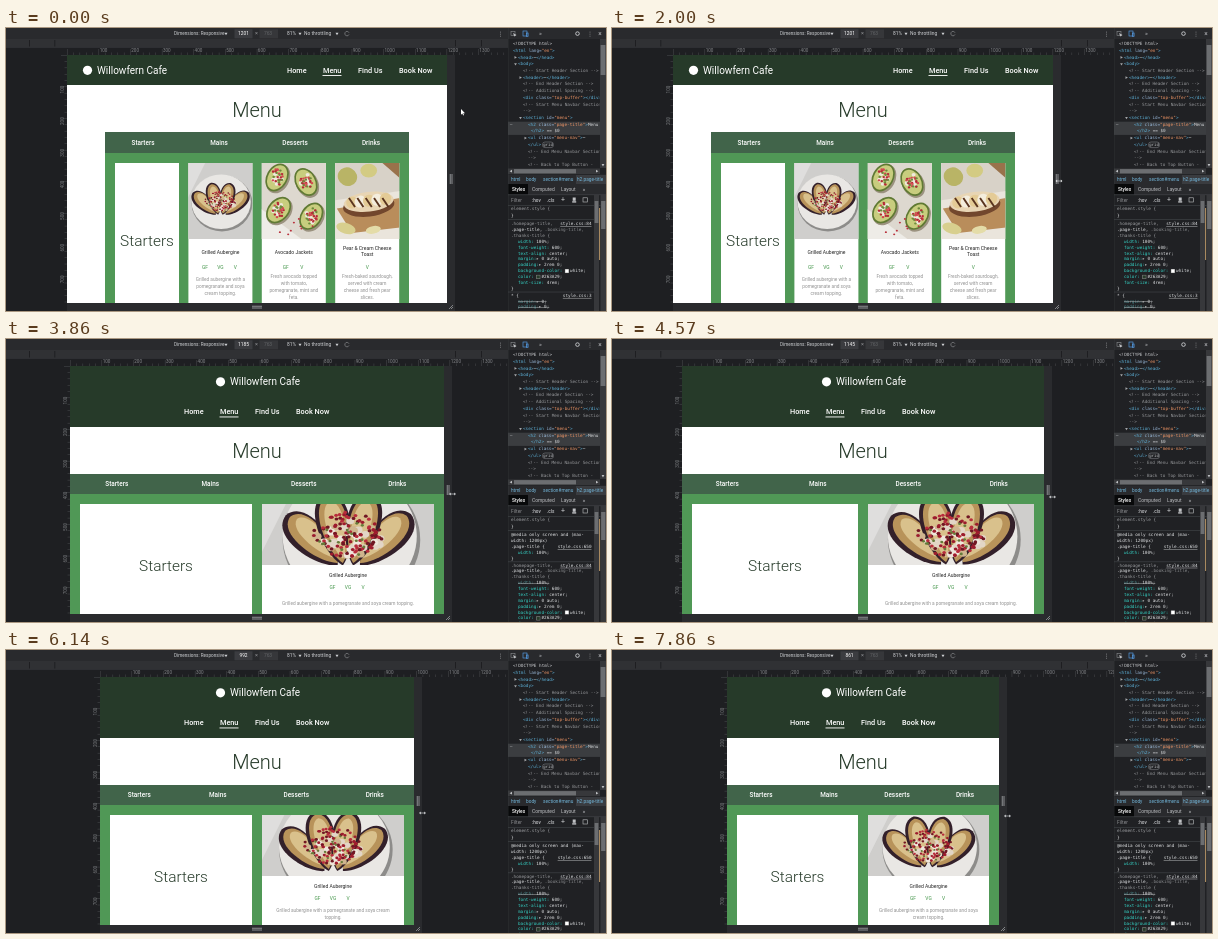
An HTML page with a canvas for the animation above (8000 ms loop, 600 by 283 pixels).

```html
<!DOCTYPE html>
<html lang="en">
<head>
<meta charset="utf-8">
<title>Responsive menu page</title>
<style>
html, body { margin: 0; width: 100%; height: 100%; overflow: hidden; background: #1e1f22; }
canvas { display: block; width: 600px; height: 283px; }
</style>
</head>
<body>
<canvas id="stage"></canvas>
<script>
const W = 600, H = 283, LOOP = 8000, FPS = 7;
const SCALE = 380 / 1201, MID = 251, TOP = 27, BOTTOM = 275;
const SANS = 'Roboto, sans-serif', MONO = '"DejaVu Sans Mono", monospace', CODE = 4.33;
const DARK = '#263a29', BAR = '#41644a', GREEN = '#509856';

// [frame, value] keys, linear in between
const WIDTHS = [[0, 1201], [23, 1201], [24, 1199], [27, 1185], [31, 1157], [37, 1084],
  [43, 992], [47, 948], [51, 907], [55, 861]];
const CURSOR_X = [[0, 456], [1, 456], [9, 447]];
const CURSOR_Y = [[0, 84], [1, 84], [9, 153], [23, 153], [27, 155], [37, 161], [43, 163], [51, 165], [55, 166]];

const canvas = document.getElementById('stage');
const ctx = canvas.getContext('2d');
const dpr = window.devicePixelRatio || 1;
canvas.width = W * dpr;
canvas.height = H * dpr;

function at(keys, f) {
  for (let i = 1; i < keys.length; i++) {
    const [a, va] = keys[i - 1], [b, vb] = keys[i];
    if (f <= b) return va + (vb - va) * (f - a) / (b - a);
  }
  return keys[keys.length - 1][1];
}

function random(seed) {
  return () => (seed = (seed * 16807) % 2147483647) / 2147483647;
}

function rect(x, y, w, h, color) {
  ctx.fillStyle = color;
  ctx.fillRect(x, y, w, h);
}

function text(s, x, y, size, color, align = 'left', font = SANS, weight = 400) {
  ctx.font = `${weight} ${size}px ${font}`;
  ctx.textAlign = align;
  ctx.textBaseline = 'middle';
  ctx.fillStyle = color;
  ctx.fillText(s, x, y);
}

function oval(x, y, rx, ry, color, turn = 0) {
  ctx.fillStyle = color;
  ctx.beginPath();
  ctx.ellipse(x, y, rx, ry, turn, 0, 7);
  ctx.fill();
}

function poly(points, color) {
  ctx.fillStyle = color;
  ctx.beginPath();
  points.forEach(([x, y]) => ctx.lineTo(x, y));
  ctx.fill();
}

function stroke(points, color, width = 0.7) {
  ctx.strokeStyle = color;
  ctx.lineWidth = width;
  ctx.beginPath();
  points.forEach(([x, y], i) => i ? ctx.lineTo(x, y) : ctx.moveTo(x, y));
  ctx.stroke();
}

function arrow(x, y, r, color, open = true) {
  poly(open ? [[x - r, y - r * 0.7], [x + r, y - r * 0.7], [x, y + r]]
    : [[x - r * 0.7, y - r], [x + r, y], [x - r * 0.7, y + r]], color);
}

// Square photo of the given size, cropped to the box, drawn around its centre
function photo(x, y, w, h, paint) {
  const size = Math.max(w, h);
  ctx.save();
  ctx.beginPath();
  ctx.rect(x, y, w, h);
  ctx.clip();
  ctx.translate(x + w / 2, y + h / 2);
  ctx.scale(size, size);
  paint();
  ctx.restore();
}

function seeds(n, seed, cx, cy, rx, ry, r, colors) {
  const next = random(seed);
  for (let i = 0; i < n; i++) {
    const a = next() * 6.28, d = Math.sqrt(next());
    oval(cx + Math.cos(a) * d * rx, cy + Math.sin(a) * d * ry, r, r * 0.85, colors[i % colors.length]);
  }
}

// Half fruit with a narrow base at x, y and a round top
function lobe(x, y, len, wide, turn, color) {
  ctx.save();
  ctx.translate(x, y);
  ctx.rotate(turn);
  ctx.fillStyle = color;
  ctx.beginPath();
  ctx.moveTo(0, 0);
  ctx.bezierCurveTo(-wide, -len * 0.2, -wide * 1.6, -len * 0.95, 0, -len);
  ctx.bezierCurveTo(wide * 1.6, -len * 0.95, wide, -len * 0.2, 0, 0);
  ctx.fill();
  ctx.restore();
}

function aubergine() {
  rect(-0.5, -0.5, 1, 1, '#cfcecc');
  poly([[-0.5, -0.5], [-0.2, -0.5], [-0.5, 0.1]], '#dfdedd');
  oval(0.02, 0.03, 0.4, 0.37, '#8d8c8a');
  oval(0.01, 0.01, 0.39, 0.36, '#e9e7e4');
  for (const [x, len, turn] of [[-0.06, 0.42, -0.8], [0.07, 0.42, 0.78], [-0.03, 0.43, -0.22], [0.03, 0.43, 0.24]]) {
    lobe(x, 0.18, len, 0.1, turn, '#33202a');
    lobe(x, 0.165, len - 0.035, 0.08, turn, '#b8935a');
    lobe(x, 0.14, len - 0.09, 0.055, turn, '#d9c18c');
  }
  seeds(38, 31, 0, 0.02, 0.2, 0.11, 0.023, ['#eee6db', '#e2d5c6', '#cfb58f']);
  seeds(105, 77, 0, 0.0, 0.2, 0.13, 0.011, ['#9c1c2d', '#b82c3c', '#701723']);
  seeds(16, 9, 0, 0.03, 0.19, 0.1, 0.009, ['#657b3a']);
}

function avocado() {
  rect(-0.5, -0.5, 1, 1, '#ddd8cf');
  poly([[-0.5, 0.05], [0.1, 0.5], [-0.5, 0.5]], '#eeece7');
  [[-0.22, -0.31, 0.5], [0.16, -0.25, -0.5], [-0.2, 0.12, 0.7], [0.23, 0.2, 0.6]].forEach(([x, y, turn], i) => {
    oval(x + 0.015, y + 0.02, 0.145, 0.2, '#9b927f', turn);
    oval(x, y, 0.14, 0.195, '#607a34', turn);
    oval(x, y, 0.118, 0.172, '#c8cd7e', turn);
    seeds(10, 8 + i, x, y, 0.08, 0.1, 0.026, ['#f0e9df']);
    seeds(26, 41 + i, x, y, 0.08, 0.11, 0.017, ['#b42a36', '#d34a50', '#6d8a3c']);
  });
  seeds(10, 19, 0, 0.33, 0.35, 0.12, 0.014, ['#b9323d']);
}

function toast() {
  rect(-0.5, -0.5, 1, 1, '#d8d2c8');
  poly([[-0.5, 0.0], [0.5, -0.14], [0.5, 0.5], [-0.5, 0.5]], '#eae5dc');
  poly([[-0.4, 0.1], [0.5, -0.05], [0.5, 0.34], [-0.2, 0.42]], '#b98d5b');
  oval(-0.26, -0.32, 0.13, 0.12, '#b9b466', 0.5);
  oval(0.02, -0.4, 0.11, 0.09, '#d3cb83');
  poly([[0.2, -0.5], [0.5, -0.5], [0.5, -0.24]], '#99724b');
  oval(0.02, 0.06, 0.34, 0.145, '#72472d', -0.12);
  oval(0.02, 0.01, 0.33, 0.13, '#e8d5b4', -0.12);
  for (let i = 0; i < 5; i++) {
    oval(-0.2 + i * 0.11, 0.02 - i * 0.012, 0.075, 0.08, i % 2 ? '#f4eddd' : '#e4cb96', 0.5);
    stroke([[-0.24 + i * 0.11, -0.04], [-0.16 + i * 0.11, 0.08]], '#59341f', 0.025);
  }
  oval(-0.28, 0.36, 0.13, 0.07, '#d8cf8e', 0.3);
  oval(0.08, 0.38, 0.1, 0.05, '#e4dca8', -0.2);
}

function tags(list, x, y) {
  list.forEach(([s, dx]) => text(s, x + dx, y, 4.9, '#429448', 'center'));
}

function lines(list, x, mid, gap, size, color) {
  list.forEach((s, i) => text(s, x, mid + (i - (list.length - 1) / 2) * gap, size, color, 'center'));
}

const DIET = [['GF', -15.5], ['VG', 0], ['V', 15]];
const CARDS = [
  [aubergine, ['Grilled Aubergine'], DIET,
    ['Grilled aubergine with a', 'pomegranate and soya', 'cream topping.']],
  [avocado, ['Avocado Jackets'], [['GF', -8], ['V', 8]],
    ['Fresh avocado topped', 'with tomato,', 'pomegranate, mint and', 'feta.']],
  [toast, ['Pear & Cream Cheese', 'Toast'], [['V', 0]],
    ['Fresh-baked sourdough,', 'served with cream', 'cheese and fresh pear', 'slices.']]
];

function siteHeader(logoX, logoY, navX, navY) {
  oval(logoX, logoY, 4.6, 4.6, '#fff');
  text('Willowfern Cafe', logoX + 9.5, logoY + 0.5, 10, '#fff');
  [['Home', 0], ['Menu', 36], ['Find Us', 71], ['Book Now', 112]].forEach(([s, dx]) =>
    text(s, navX + dx, navY, 7.3, '#fff', 'left', SANS, 500));
  rect(navX + 35.5, navY + 4.5, 19, 0.9, '#fff');
}

function categories(x, y, w, h) {
  rect(x, y, w, h, BAR);
  ['Starters', 'Mains', 'Desserts', 'Drinks'].forEach((s, i) =>
    text(s, x + w * (i + 0.5) / 4, y + h / 2 + 0.5, 6.4, '#fff', 'center', SANS, 500));
}

function heading(s, x, y, size) {
  text(s, x, y, size, DARK, 'center', SANS, 300);
}

function desktopPage(x, w) {
  rect(x, TOP, w, BOTTOM - TOP, '#fff');
  rect(x, TOP, w, 30, DARK);
  siteHeader(81.5, 42.3, 281, 42.5);
  heading('Menu', MID, 83.5, 20);
  const left = x + w * 0.1, cw = 64;
  rect(left, 104, w * 0.8, BOTTOM - 104, GREEN);
  categories(left, 104, w * 0.8, 21);
  for (let i = 0; i < 4; i++) rect(left + 10 + i * 73.4, 135, cw, BOTTOM - 135, '#fff');
  heading('Starters', left + 42, 213, 15.4);
  CARDS.forEach(([paint, name, diet, about], i) => {
    const cx = left + 10 + (i + 1) * 73.4, mid = cx + cw / 2;
    photo(cx, 135, cw, 76, paint);
    lines(name, mid, name.length > 1 ? 223.3 : 225, 6, 5, '#222');
    tags(diet, mid, 240);
    lines(about, mid, 259, 7, 4.75, '#929292');
  });
}

function compactPage(x, w) {
  rect(x, TOP, w, 61, DARK);
  siteHeader(214.5, 42.8, 178, 73);
  rect(x, 88, w, 47, '#fff');
  heading('Menu', MID, 113.5, 20);
  rect(x, 155, w, BOTTOM - 155, GREEN);
  categories(x, 135, w, 20);
  const cw = w / 2 - 15, right = MID + 5, mid = right + cw / 2;
  rect(x + 10, 165, cw, BOTTOM - 165, '#fff');
  heading('Starters', x + 10 + cw / 2, 227.5, 15.4);
  rect(right, 165, cw, BOTTOM - 165, '#fff');
  photo(right, 165, cw, 61, aubergine);
  text('Grilled Aubergine', mid, 237, 5, '#222', 'center');
  tags(DIET, mid, 249);
  const start = 'Grilled aubergine with a pomegranate and soya';
  const about = cw > 147 ? [start + ' cream topping.']
    : cw > 124 ? [start + ' cream', 'topping.'] : [start, 'cream topping.'];
  lines(about, mid, 264.3, 7, 4.75, '#929292');
}

function rulers(x) {
  for (let n = 0; x + n * SCALE * 20 < 502; n++) {
    const tx = x + n * SCALE * 20, big = n % 5 === 0;
    rect(tx, big ? 21 : 24.5, 0.4, big ? 6 : 2.5, '#55575a');
    if (big && n) text(n * 20, tx + 1, 23, 4.6, '#85878a');
  }
  for (let n = 0; n < 40; n++) {
    const ty = TOP + n * SCALE * 20, big = n % 5 === 0;
    rect(x - (big ? 6 : 2.5), ty, big ? 6 : 2.5, 0.4, '#55575a');
    if (big && n) {
      ctx.save();
      ctx.translate(x - 4.2, ty - 1);
      ctx.rotate(-Math.PI / 2);
      text(n * 20, 0, 0, 4.6, '#77797c', 'right');
      ctx.restore();
    }
  }
}

function toolbar(width) {
  const ink = '#d0d2d5';
  rect(0, 0, 502, 11, '#292a2d');
  rect(0, 11, 502, 8, '#303134');
  [23, 48.5, 449, 475].forEach(x => rect(x, 12, 0.7, 6.5, '#17181a'));
  rect(0, 19, 502, 0.6, '#3a3b3e');
  text('Dimensions: Responsive', 168, 5.8, 4.65, ink);
  text('81%', 281, 5.8, 4.9, ink);
  text('No throttling', 298, 5.8, 4.9, ink);
  [220, 294, 331].forEach(x => arrow(x, 5.8, 1.5, ink));
  rect(228.5, 1.3, 18, 9, '#3b3c40');
  text(Math.round(width), 237.5, 5.9, 4.9, '#fff', 'center');
  text('×', 250.5, 5.8, 5.5, '#9a9c9f', 'center');
  rect(253.5, 1.3, 18.5, 9, '#36373a');
  text('763', 262, 5.9, 4.9, '#636568', 'center');
  ctx.strokeStyle = '#8a8c8f';
  ctx.lineWidth = 0.7;
  ctx.beginPath();
  ctx.arc(341, 5.6, 2.2, 0.4, 5.8);
  ctx.stroke();
  text('⋮', 494.5, 6, 6, ink, 'center', '"DejaVu Sans", sans-serif');
}

const TREE = [
  [507, '<!DOCTYPE html>'], [507, '<html lang="en">'], [512, '<head>⋯</head>', 0], [512, '<body>', 1],
  [517, '<!-- Start Header Section -->'], [517, '<header>⋯</header>', 0],
  [517, '<!-- End Header Section -->'], [517, '<!-- Additional Spacing -->'],
  [517, '<div class="top-buffer"></div>'], [517, '<!-- Start Menu Navbar Section'], [517, '-->'],
  [517, '<section id="menu">', 1], [522, '<h2 class="page-title">Menu'], [525, '</h2> == $0'],
  [522, '<ul class="menu-nav">⋯', 0], [522, '</ul>'], [522, '<!-- End Menu Navbar Section'],
  [522, '-->'], [522, '<!-- Back to Top Button -']
];

function code(x, y, parts) {
  for (const [s, color] of parts) {
    text(s, x, y, CODE, color, 'left', MONO);
    x += ctx.measureText(s).width;
  }
}

function markup(s) {
  if (/^(<!|-->)/.test(s)) return [[s, s[2] === 'D' ? '#d0d2d5' : '#96989b']];
  return s.split(/(<\/?\w+|>|"[^"]*"|\w+=)/).filter(Boolean).map(p =>
    [p, /^[<>]/.test(p) ? '#5db0d7' : p[0] === '"' ? '#f29766' : /=$/.test(p) && p.length > 2 ? '#9bbbdc' : '#d6d8da']);
}

const TITLE_RULE = [
  '.homepage-title,|style.css:84', '.page-title, .booking-title,', '.thanks-title {',
  'width: 100%;', 'font-weight: 600;', 'text-align: center;', 'margin:▸ 0 auto;', 'padding:▸ 2rem 0;',
  'background-color: #white;', 'color: #263A29;', 'font-size: 4rem;', '}'
];
const WIDE_RULES = [...TITLE_RULE, '---', '* {|style.css:3', '~margin:▸ 0;', '~padding:▸ 0;'];
const NARROW_RULES = [
  '@media only screen and (max-', 'width: 1200px)', '.page-title {|style.css:650', 'width: 100%;', '}', '---',
  ...TITLE_RULE.map(s => s.startsWith('width') ? '~' + s : s)
];

function styleRules(rules) {
  let y = 196;
  for (const rule of rules) {
    if (rule === '---') {
      rect(502, y - 2.8, 86, 0.5, '#494c50');
      y += 1;
      continue;
    }
    const [body, link] = rule.split('|');
    const struck = body[0] === '~', s = body.replace('~', '');
    const prop = s.match(/^([\w-]+):(.*;)$/);
    if (prop) {
      const swatch = prop[2].includes('#');
      const name = prop[1] + (prop[2][0] === '▸' ? ':' : ': '), value = prop[2].replace('#white', 'white').trim();
      code(512, y, [[name, struck ? '#4c8c8f' : '#35d4c7'], [swatch ? '  ' + value : value, '#dfe1e3']]);
      ctx.font = `${CODE}px ${MONO}`;
      const size = ctx.measureText(name).width;
      if (swatch) {
        rect(512 + size, y - 2, 4, 4, '#999');
        rect(512.4 + size, y - 1.6, 3.2, 3.2, value === 'white;' ? '#fff' : DARK);
      }
      if (struck) rect(512, y, size + ctx.measureText(value).width, 0.5, '#b0b2b5');
    } else {
      const cut = s.indexOf('.booking');
      code(505, y, cut > 0 ? [[s.slice(0, cut), '#e2e4e6'], [s.slice(cut), '#898b8e']]
        : [[s, /^\.(home|thanks)/.test(s) ? '#989a9d' : '#e2e4e6']]);
    }
    if (link) {
      text(link, 585.5, y, CODE, '#e0e2e4', 'right', MONO);
      const size = ctx.measureText(link).width;
      rect(585.5 - size, y + 2.4, size, 0.4, '#e0e2e4');
    }
    y += 5.88;
  }
}

function scrollbar(x, y, w, h, from, size) {
  rect(x, y, w, h, '#37383b');
  if (h > w) rect(x + 0.6, from, w - 1.2, size, '#6c6e71');
  else rect(from, y + 0.6, size, h - 1.2, '#6c6e71');
}

function inspector(narrow) {
  const ink = '#bfc1c4';
  ctx.save();
  ctx.beginPath();
  ctx.rect(502, 0, 98, H);
  ctx.clip();
  rect(502, 0, 98, H, '#202124');
  rect(502, 0, 98, 11, '#292a2d');
  ctx.strokeStyle = '#8b8d90';
  ctx.lineWidth = 0.6;
  ctx.strokeRect(505, 3.3, 4, 4);
  poly([[507, 5], [510.5, 7], [508.3, 8.5]], ink);
  ctx.strokeStyle = '#58a6f4';
  ctx.strokeRect(517, 3, 4, 5);
  ctx.strokeRect(520.3, 5, 1.8, 3.5);
  text('»', 534.5, 5.5, 6, ink, 'center');
  ctx.strokeStyle = ink;
  ctx.lineWidth = 1;
  ctx.beginPath();
  ctx.arc(571.5, 5.6, 1.8, 0, 7);
  ctx.stroke();
  text('⋮', 584, 6, 6, ink, 'center', '"DejaVu Sans", sans-serif');
  text('×', 594, 5.8, 6.5, ink, 'center');

  rect(502, 93.7, 92, 13.2, '#3b3d40');
  text('⋯', 505, 97, 4.5, '#a0a2a5', 'center', MONO);
  ctx.save();
  ctx.beginPath();
  ctx.rect(502, 11, 91.5, 128.5);
  ctx.clip();
  TREE.forEach(([x, s, open], i) => {
    const y = 16 + i * 6.72;
    code(x, y, markup(s));
    if (open !== undefined) arrow(x - 2.5, y, 1.4, '#a5a7aa', open === 1);
  });
  ctx.restore();
  ctx.strokeStyle = '#8b8d90';
  ctx.lineWidth = 0.5;
  ctx.beginPath();
  ctx.roundRect(536.5, 114, 11, 5.6, 2.5);
  ctx.stroke();
  text('grid', 542, 116.8, 4, ink, 'center', MONO);
  scrollbar(594, 11, 6, 129, 17, 30);
  scrollbar(502, 140.5, 92, 5.5, 508, 62);
  arrow(597, 137, 1.4, ink);
  arrow(505, 143.2, -1.4, ink, false);
  arrow(591, 143.2, 1.4, ink, false);

  rect(502, 146.5, 98, 10, '#292a2d');
  rect(570, 147, 30, 9, '#3a3c40');
  [['html', 505], ['body', 520], ['section#menu', 537], ['h2.page-title', 571]].forEach(([s, x]) =>
    text(s, x, 152, 4.75, '#74b9dd'));
  rect(502, 156, 98, 11, '#292a2d');
  rect(502, 156, 20, 10.5, '#08090a');
  text('Styles', 506, 161.7, 4.8, '#fff', 'left', SANS, 500);
  text('Computed', 526, 161.7, 4.9, ink);
  text('Layout', 555, 161.7, 4.9, ink);
  text('»', 578, 161.3, 6, ink, 'center');
  rect(502, 166.6, 98, 0.5, '#494c50');
  text('Filter', 505, 172.3, 4.9, '#8b8d90');
  text(':hov', 526, 172.3, 4.7, ink, 'left', SANS, 500);
  text('.cls', 541, 172.3, 4.7, ink, 'left', SANS, 500);
  text('+', 557, 172, 7, ink, 'center');
  rect(566.7, 169.5, 3, 3.3, ink);
  rect(566.2, 173.2, 4, 1.4, ink);
  ctx.strokeStyle = ink;
  ctx.lineWidth = 0.6;
  ctx.strokeRect(577, 169.8, 4.5, 4.2);
  rect(502, 177, 98, 0.5, '#494c50');
  code(505, 181.2, [['element.style {', '#a0a2a5']]);
  code(505, 187.6, [['}', '#e2e4e6']]);
  rect(502, 191.5, 86, 0.5, '#494c50');
  styleRules(narrow ? NARROW_RULES : WIDE_RULES);
  scrollbar(588, 167, 5, 116, 173, 22);
  rect(593, 180, 1.2, 52, '#a98a60');
  scrollbar(594.5, 167, 5.5, 116, 173, 28);
  rect(501.5, 0, 0.7, H, '#494c50');
  ctx.restore();
}

function handles(x, w) {
  const right = x + w;
  rect(right, TOP, 8, H - TOP, '#2a2b2e');
  rect(x, BOTTOM, w + 8, H - BOTTOM, '#2a2b2e');
  [-1.2, 0.6].forEach(d => {
    rect(right + 4 + d, 146, 0.8, 10, '#a6a8ab');
    rect(MID - 5, 279 + d, 10, 0.8, '#a6a8ab');
  });
  stroke([[right + 2, 281], [right + 6, 277]], '#a6a8ab');
  stroke([[right + 4, 281], [right + 6, 279]], '#a6a8ab');
}

function pointer(x, y, resizing) {
  if (resizing) {
    rect(x - 2.5, y - 0.3, 5, 0.6, '#d8dadc');
    [-1, 1].forEach(d =>
      poly([[x + d * 3.4, y], [x + d * 1.8, y - 1.4], [x + d * 1.8, y + 1.4]], '#e6e8ea'));
  } else {
    poly([[x - 1, y - 3], [x - 1, y + 2.8], [x + 0.3, y + 1.6], [x + 1.2, y + 3.4],
      [x + 2, y + 3], [x + 1.2, y + 1.3], [x + 3, y + 1.2]], '#fff');
  }
}

function draw(ms) {
  const frame = Math.floor((ms % LOOP + 5) * FPS / 1000) % (LOOP * FPS / 1000);
  const width = at(WIDTHS, frame), x = Math.round(MID - width * SCALE / 2), w = 2 * (MID - x);
  const narrow = width <= 1200;
  ctx.setTransform(dpr, 0, 0, dpr, 0, 0);
  rect(0, 0, W, H, '#1e1f22');
  toolbar(width);
  rulers(x);
  handles(x, w);
  (narrow ? compactPage : desktopPage)(x, w);
  inspector(narrow);
  const px = frame < 24 ? at(CURSOR_X, frame) : x + w + 8.5;
  pointer(px, at(CURSOR_Y, frame), frame >= 9);
}

let start;
function tick(now) {
  if (start === undefined) start = now;
  draw(now - start);
  requestAnimationFrame(tick);
}
draw(0);
requestAnimationFrame(tick);
</script>
</body>
</html>
```
